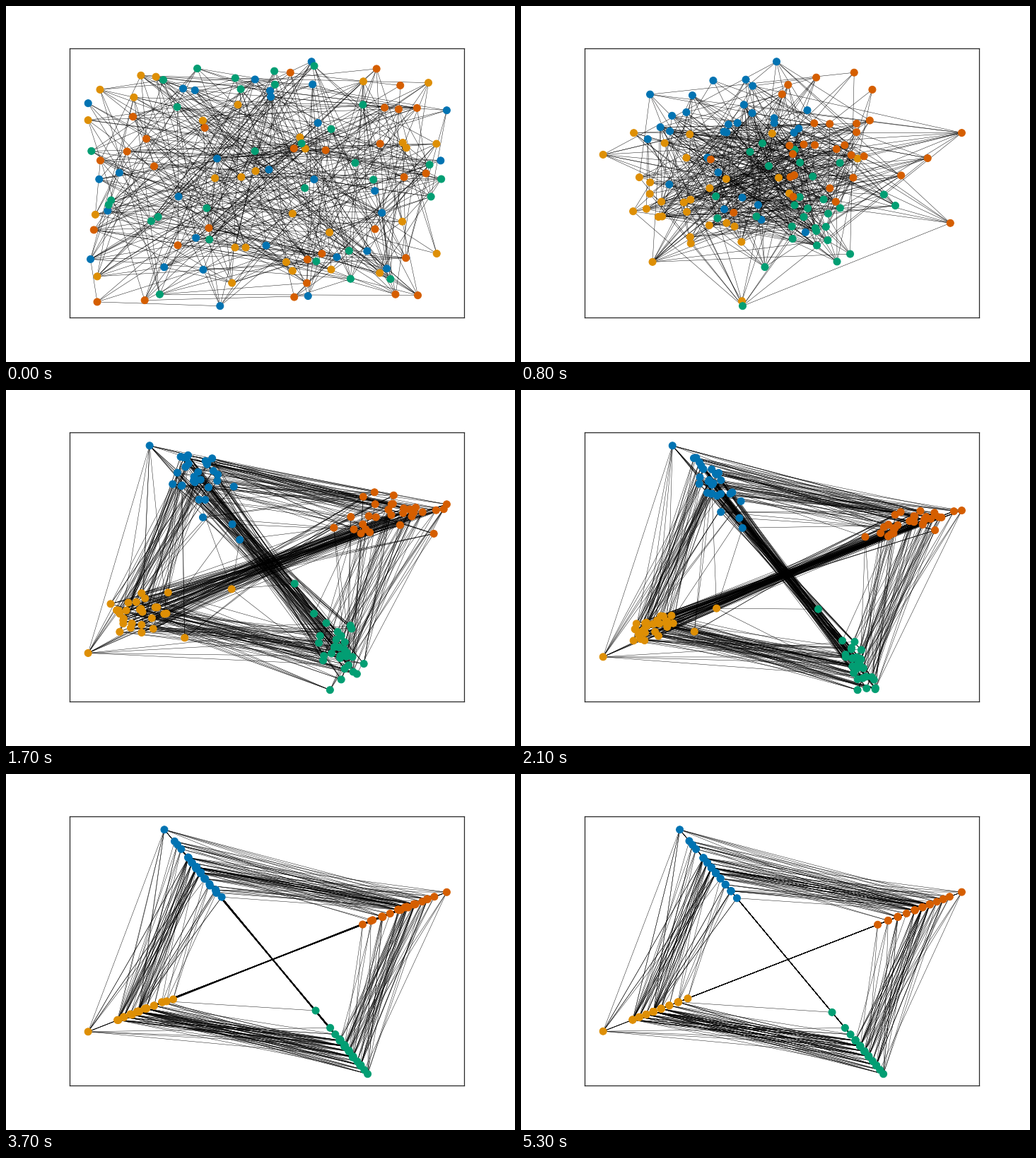
Write a matplotlib script that moves like this. It is 720 px wide and 504 px high and loops after 5.4 s.

```python
import numpy as np
import matplotlib.pyplot as plt
from matplotlib.animation import FuncAnimation
from matplotlib.collections import LineCollection

FRAMES, INTERVAL = 54, 100
CLASS_SIZE = 30
RATE = 0.46                        # diffusion time per frame
AXIS = np.array([0.0109, 0.0062])  # direction all nodes settle on, before rotation
OPPOSITE = 1.5                     # preference for edges to the facing class
COLORS = ["#0173b2", "#de8f05", "#029e73", "#d55e00"]

# Per class: lowest and highest common degree (self-loop included), then outliers
DEGREES = [(4, 11, [13, 14, 15, 18]), (5, 12, [17]), (5, 14, [3]), (4, 13, [15])]

group = np.repeat(np.arange(4), CLASS_SIZE)
n = len(group)


def draw_degrees(rng):
    """Every common degree once, the rest bell-shaped around the mean."""
    parts = []
    for low, high, outliers in DEGREES:
        fixed = list(range(low, high + 1)) + outliers
        bell = rng.normal(8.8, 1.8, CLASS_SIZE - len(fixed)).round()
        bell = np.clip(bell, low + 1, high)
        parts.append(rng.permutation(np.concatenate([fixed, bell])))
    return np.concatenate(parts)


def build_graph(degree, rng):
    """Random 4-partite graph with the given degrees, or None on a dead end."""
    adj = np.zeros((n, n))
    left = degree.copy()
    while left.sum() > 0:
        fullest = np.argmax(np.bincount(group, left))
        weight = left * (group == fullest)
        a = rng.choice(n, p=weight / weight.sum())
        weight = left * (group != fullest) * (adj[a] == 0)
        weight[group == (fullest + 2) % 4] *= OPPOSITE
        if weight.sum() == 0:
            return None
        b = rng.choice(n, p=weight / weight.sum())
        adj[a, b] = adj[b, a] = 1
        left[[a, b]] -= 1
    return adj


def rotate(points, quarter_turns):
    angle = quarter_turns * np.pi / 2
    c, s = np.cos(angle), np.sin(angle)
    x, y = points.T
    return np.column_stack([c * x - s * y, s * x + c * y])


rng = np.random.default_rng(7)
start = rng.uniform(-0.5, 0.5, (n, 2))
adj = None
while adj is None:
    degree = draw_degrees(rng)
    adj = build_graph(degree - 1, rng)
edges = np.argwhere(np.triu(adj))

# Diffusion with the normalised Laplacian, each class in its own rotated frame
root = np.sqrt(degree)
lam, modes = np.linalg.eigh(np.eye(n) - (adj + np.eye(n)) / np.outer(root, root))
lam[0] = 1  # the constant mode is already covered by the resting state
turns = group + 1
rest = np.outer(root, AXIS)
coeffs = modes.T @ (rotate(start, -turns) - rest)


def positions(frame):
    """Node positions as fractions of the axes box, scaled to fill it."""
    decay = np.exp(-RATE * frame * lam)[:, None]
    pts = rotate(rest + modes @ (decay * coeffs), turns)
    low, high = pts.min(axis=0), pts.max(axis=0)
    return ((pts - low) / (high - low) + 0.05) / 1.1 + (0.0014, -0.0026)


fig = plt.figure(figsize=(10, 7), dpi=72, facecolor="white")
ax = fig.add_axes([0.125, 0.125, 0.775, 0.755])
ax.set(xlim=(0, 1), ylim=(0, 1), xticks=[], yticks=[])
for spine in ax.spines.values():
    spine.set(linewidth=1.25, edgecolor="0.15")

lines = LineCollection([], colors="black", linewidths=0.45, zorder=1)
ax.add_collection(lines, autolim=False)
dots = ax.scatter(*positions(0).T, s=100, c=[COLORS[g] for g in group],
                  linewidths=1, zorder=2)


def update(frame):
    pts = positions(frame)
    lines.set_segments(pts[edges])
    dots.set_offsets(pts)
    return lines, dots


anim = FuncAnimation(fig, update, frames=FRAMES, interval=INTERVAL,
                     repeat=True, repeat_delay=0)
plt.show()
```
